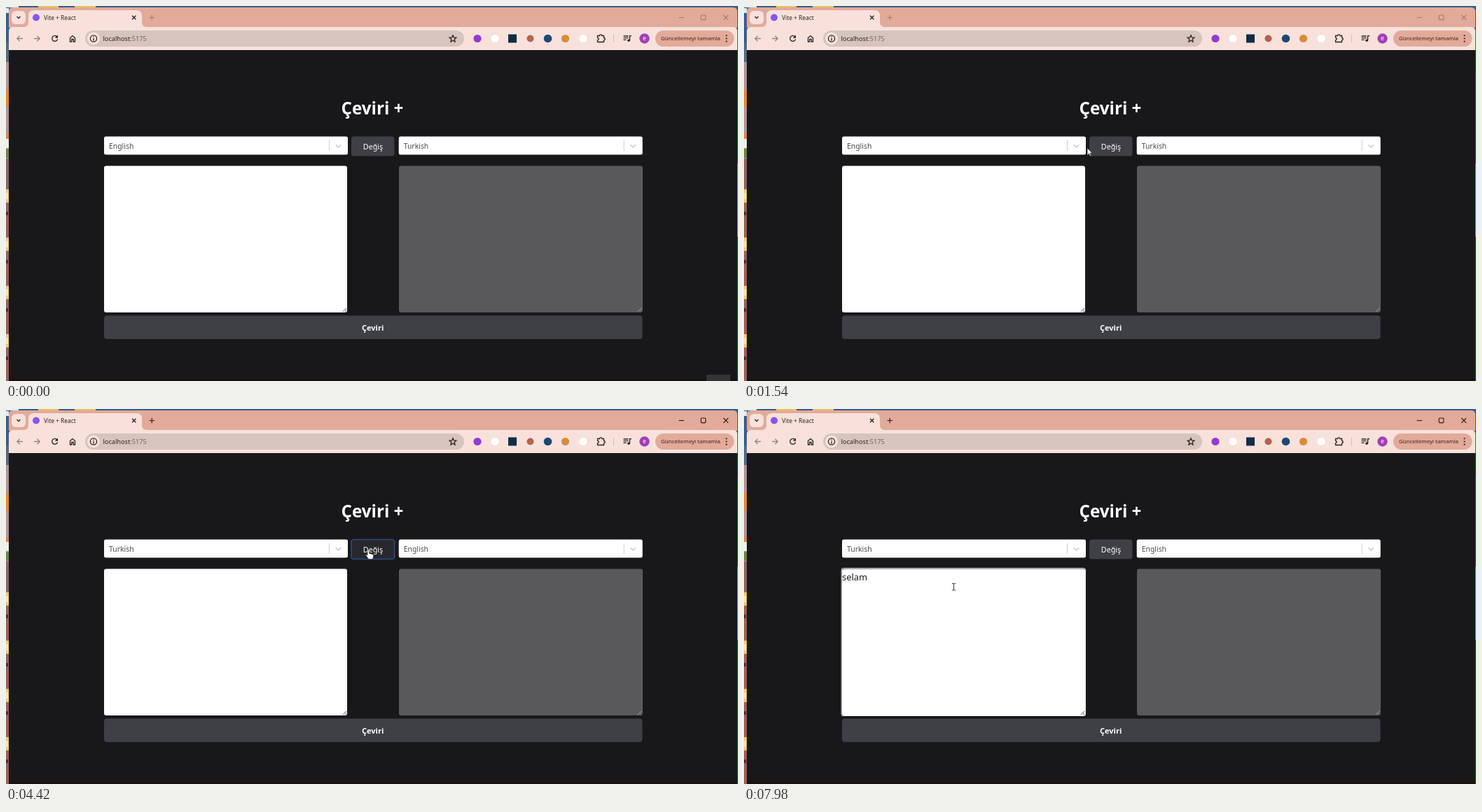
An HTML page that plays this animation: 1045 by 536 pixels, repeating every 8 s.

```html
<!DOCTYPE html>
<html lang="tr">
<head>
<meta charset="utf-8">
<title>Çeviri +</title>
<style>
  html, body { margin: 0; width: 100%; height: 100%; overflow: hidden; background: #18181a; }
  svg { display: block; width: 100vw; height: 100vh; font-family: "Noto Sans", "Open Sans", sans-serif; }
  text { white-space: pre; }
  .line { fill: none; stroke: #2a211f; stroke-width: 1.3; }
  .faded { stroke: #948580; }
  .select { font-size: 10.4px; fill: #4a4a4a; }
  .button { fill: #fff; text-anchor: middle; }
  .grey { fill: none; stroke: #ccc; }
</style>
</head>
<body>
<svg viewBox="0 0 1045 536">
  <defs>
    <pattern id="folders" width="4" height="69" y="262" patternUnits="userSpaceOnUse">
      <path fill="#a25f55" d="M0 0h4v69H0z"/>
      <path fill="#f1c965" d="M0 0h4v19H0z"/>
      <path fill="#f7e3ae" d="M0 5h3v9H0z"/>
      <path fill="#3d3535" d="M0 32h3v5H0z"/>
    </pattern>
    <g id="picker">
      <rect x="140" y="186.5" width="348" height="26" rx="2.5" fill="#fff"/>
      <path class="grey" d="M461.5 192v15"/>
      <path class="grey" stroke-width="1.6" d="M470.7 198.2l3.8 3.8 3.8-3.8"/>
    </g>
  </defs>

  <!-- Desktop edges -->
  <path fill="#35608f" d="M0 0h1045v330H0z"/>
  <path fill="#e9c45c" d="M46 0h29v2H46zM98 0h30v2H98z"/>
  <path fill="#dcecf5" d="M0 0h18v2H0zM0 3h4v7H0z"/>
  <path fill="#566a82" d="M0 52h4v28H0z"/>
  <path fill="#b49494" d="M0 80h4v145H0z"/>
  <path fill="#e8872b" d="M0 120h4v25H0zM0 183h4v7H0z"/>
  <path fill="#f1eee8" d="M0 190h4v13H0z"/>
  <path fill="#6c8a35" d="M0 204h4v13H0z"/>
  <path fill="#8d6664" d="M0 218h4v44H0z"/>
  <path fill="url(#folders)" d="M0 262h4v274H0z"/>
  <path fill="#b0473e" d="M1043 95h2v130h-2z"/>
  <path fill="#d9a45c" d="M1043 225h2v105h-2z"/>
  <path fill="#35608f" d="M1043 330h2v206h-2z"/>

  <!-- Browser window -->
  <path fill="#18181a" d="M4 60h1040v476H4z"/>
  <path fill="#1b0f10" d="M4 533h1040v3H4z"/>
  <path fill="#e2aa99" d="M4 31V8q0-6 6-6h1028q6 0 6 6v23z"/>
  <path fill="#f7e1da" d="M4 63V36q0-6 6-6h15q7 0 7-7v-9q0-8 8-8h146q8 0 8 8v9q0 7 7 7h837q6 0 6 6v27z"/>
  <rect x="8" y="7" width="20" height="19" rx="6" fill="#f7e1da"/>
  <path class="line" d="M15.5 15l2.5 2.5 2.5-2.5"/>
  <circle cx="43" cy="16.5" r="5" fill="#8a52f5"/>
  <text x="54" y="20" font-size="8.4" fill="#2e2320">Vite + React</text>
  <path class="line" d="M180 13.8l5.4 5.4m0-5.4l-5.4 5.4"/>
  <g id="windowControls" fill="none" stroke-width="1.1">
    <path d="M204.5 16.5h7.5M208.2 12.7v7.6"/>
    <path d="M960.5 16.5h7.5"/>
    <rect x="992.2" y="13" width="6.6" height="6.6" rx="1"/>
    <path d="M1024.3 13l6.8 6.8m0-6.8l-6.8 6.8"/>
  </g>

  <!-- Toolbar -->
  <path class="line faded" d="M24 46.5h-8m3.6-3.8l-3.8 3.8 3.8 3.8"/>
  <path class="line faded" d="M40 46.5h8m-3.6-3.8l3.8 3.8-3.8 3.8"/>
  <path class="line" d="M73 44a4 4 0 1 0 .6 3.5"/>
  <path fill="#2a211f" d="M74 41.5v4.2h-4.2z"/>
  <path class="line" d="M91.5 51v-5.5l3.5-3 3.5 3V51h-2.3v-3.5h-2.4V51z"/>
  <rect x="113" y="35" width="541" height="23" rx="11.5" fill="#d6c4be"/>
  <circle cx="125" cy="46.5" r="9" fill="#f7e1da"/>
  <circle class="line" cx="125" cy="46.5" r="4.6"/>
  <path class="line" d="M125 43.7v1.3m0 1v3.4"/>
  <text x="138.5" y="50" font-size="9.2" fill="#2e2320">localhost<tspan fill="#75645f">:5175</tspan></text>
  <path class="line" stroke-width="1" d="M638 41.8l1.4 3.2 3.4.3-2.6 2.3.8 3.5-3-1.9-3 1.9.8-3.5-2.6-2.3 3.4-.3z"/>
  <circle cx="673" cy="46.5" r="5.6" fill="#9637d6"/>
  <circle cx="698" cy="46.5" r="5.6" fill="#fff"/>
  <rect x="717" y="40.5" width="12" height="12" fill="#122c46"/>
  <circle cx="748.5" cy="46.5" r="5" fill="#b5634f"/>
  <circle cx="773.5" cy="46.5" r="5.8" fill="#1d4775"/>
  <circle cx="798.5" cy="46.5" r="5.6" fill="#d98b38"/>
  <circle cx="824" cy="46.5" r="5.6" fill="#fff"/>
  <path class="line" stroke-width="1.5" d="M844.5 42.5h3a1.7 1.7 0 0 1 3.4 0h2.6v3a1.7 1.7 0 0 1 0 3.4v2.6h-9v-2.8a1.7 1.7 0 0 0 0-3.4z"/>
  <path stroke="#e2b2a3" d="M867.5 41v11"/>
  <path class="line" stroke-width="1.5" d="M881.5 43h7m-7 2.7h7m-7 2.7h4m5 .8v-6.5h2.5"/>
  <circle cx="889" cy="49.3" r="1.8" fill="#2a211f"/>
  <circle cx="911.5" cy="46.5" r="7.2" fill="#a43db6"/>
  <text x="911.5" y="49.3" font-size="8.5" fill="#fff" text-anchor="middle">e</text>
  <rect x="927" y="35" width="112.5" height="23" rx="11.5" fill="#e2aa99"/>
  <text x="935" y="49.3" font-size="7.9" fill="#3c211a">Güncellemeyi tamamla</text>
  <path stroke="#2a211f" stroke-width="2.2" stroke-linecap="round" d="M1028.5 42.3h0m0 4.2h0m0 4.2h0"/>

  <!-- Translator -->
  <text class="button" x="523" y="155" font-size="24.2" font-weight="600">Çeviri +</text>
  <use href="#picker"/>
  <use href="#picker" x="420.7"/>
  <text class="select" id="sourceLanguage" x="147" y="203.8"></text>
  <text class="select" id="targetLanguage" x="567.7" y="203.8"></text>
  <rect id="swapButton" x="493" y="186.5" width="61.5" height="28" rx="3.5" stroke-width="1.6"/>
  <text class="button" x="524" y="204.8" font-size="10.7" font-weight="500">Değiş</text>
  <g id="focusRing">
    <rect x="138.7" y="227.2" width="349.3" height="211.8" rx="3.5" fill="#fff"/>
    <rect x="139.6" y="228.1" width="347.5" height="210" rx="2.8" fill="#18181a"/>
  </g>
  <rect id="inputBox" x="140" y="228.5" width="347" height="209.5" rx="3" fill="#fff"/>
  <rect x="561" y="228.5" width="348" height="209.5" rx="3" fill="#59595b"/>
  <path stroke="#555" d="M480.5 437l5.5-5m-2.5 5l2.5-2.2"/>
  <path stroke="#ddd" d="M902.3 437l5.5-5m-2.5 5l2.5-2.2"/>
  <path stroke="#222" d="M903.3 437.2l5-4.6m-2.4 4.6l2.4-2"/>
  <text id="typed" x="140" y="245" font-size="12.9" fill="#1c1c1c"></text>
  <path id="caret" stroke="#000" d="M.5 230v19"/>
  <rect id="submitButton" x="140" y="442.5" width="768.5" height="33.5" rx="4" stroke-width="1.6"/>
  <text class="button" x="523.7" y="463.8" font-size="11" font-weight="600">Çeviri</text>

  <path id="tooltip" fill="#343436" d="M1000 527h34v9h-34z"/>
  <circle id="clickMark" r="9" fill="#b9ad12" fill-opacity=".85"/>
  <g id="cursor">
    <path id="arrow" fill="#fff" stroke="#222" stroke-width=".6" d="M0 0v10.2l2.4-2.1 1.5 3.3 1.6-.7-1.5-3.2H7z"/>
    <path id="hand" fill="#fff" stroke="#222" stroke-width=".5" d="M-1.2 1.2q1.2-2.2 2.4 0v4l4.4 1q1.8.5 1.6 2.4l-.8 4.6H.4l-4-5.5q.4-1.6 2.4.4z"/>
    <path id="beam" fill="none" stroke="#333" d="M-2.5-4.5h2l.5.5.5-.5h2M0-4v8.5M-2.5 5h2l.5-.5.5.5h2"/>
  </g>
</svg>
<script>
const LOOP = 8000;
const el = id => document.getElementById(id);
const show = (id, visible) => el(id).style.display = visible ? '' : 'none';
const within = (t, from, to) => t >= from && t < to;

// Pointer waypoints: time, x, y
const route = [
  [380, 376, 455], [460, 381, 438], [540, 386.5, 416], [680, 424, 338], [840, 466, 246],
  [980, 483, 200], [1140, 491, 208], [1220, 512, 217], [1340, 555, 217], [1450, 520, 217],
  [1540, 490, 203], [1680, 504, 202], [1820, 518, 199.5], [3699, 518, 199.5], [3700, 517.5, 201],
  [4420, 517.5, 201], [4500, 500, 219], [4660, 416, 249], [4800, 318, 254], [4880, 299.5, 254]
];
const clicks = [[2030, 2170], [3230, 3300], [4170, 4240], [4800, 4890]];
const swaps = [2170, 3300, 4240];
const keyTimes = [6420, 6630, 6890, 7020, 7220, 7420];
const message = 'selam ';

function pointerAt(t) {
  const next = route.findIndex(point => point[0] > t);
  if (next < 0) return route[route.length - 1].slice(1);
  if (next === 0) return route[0].slice(1);
  const [t0, x0, y0] = route[next - 1], [t1, x1, y1] = route[next];
  const k = (t - t0) / (t1 - t0);
  return [x0 + (x1 - x0) * k, y0 + (y1 - y0) * k];
}

function paintButton(id, hovered, focused) {
  el(id).setAttribute('fill', hovered ? '#28282c' : '#3f3f46');
  el(id).setAttribute('stroke', focused ? '#2c4a86' : hovered ? '#20283a' : 'none');
}

function render(t) {
  const active = t >= 2030, editing = t >= 4800;
  const [x, y] = pointerAt(t);
  const overSwap = within(t, 1620, 4450);
  const overSubmit = within(t, 380, 620);
  const overInput = x > 140 && x < 487 && y > 228 && y < 438;
  const onButton = overSwap || y > 442;

  show('tooltip', t < 70);
  el('windowControls').setAttribute('stroke', active ? '#2a1a16' : '#a47a6f');

  const swapped = swaps.filter(time => t >= time).length % 2;
  el('sourceLanguage').textContent = swapped ? 'Turkish' : 'English';
  el('targetLanguage').textContent = swapped ? 'English' : 'Turkish';
  paintButton('swapButton', overSwap, active && !editing);
  paintButton('submitButton', overSubmit, false);

  show('focusRing', editing);
  const typed = el('typed');
  typed.textContent = message.slice(0, keyTimes.filter(time => t >= time).length);
  const caretX = 140 + Math.round(typed.textContent ? typed.getComputedTextLength() : 0);
  el('caret').setAttribute('transform', `translate(${caretX})`);
  show('caret', within(t, 4800, 5430) || within(t, 5970, 7980));

  show('cursor', t >= 380);
  el('cursor').setAttribute('transform', `translate(${x} ${y})`);
  show('hand', onButton);
  show('beam', overInput && !onButton);
  show('arrow', !onButton && !overInput);
  show('clickMark', clicks.some(([down, up]) => within(t, down, up)));
  el('clickMark').setAttribute('transform', `translate(${x} ${y + .5})`);
}

const start = performance.now();
function tick() {
  render((performance.now() - start) % LOOP);
  requestAnimationFrame(tick);
}
tick();
</script>
</body>
</html>
```
